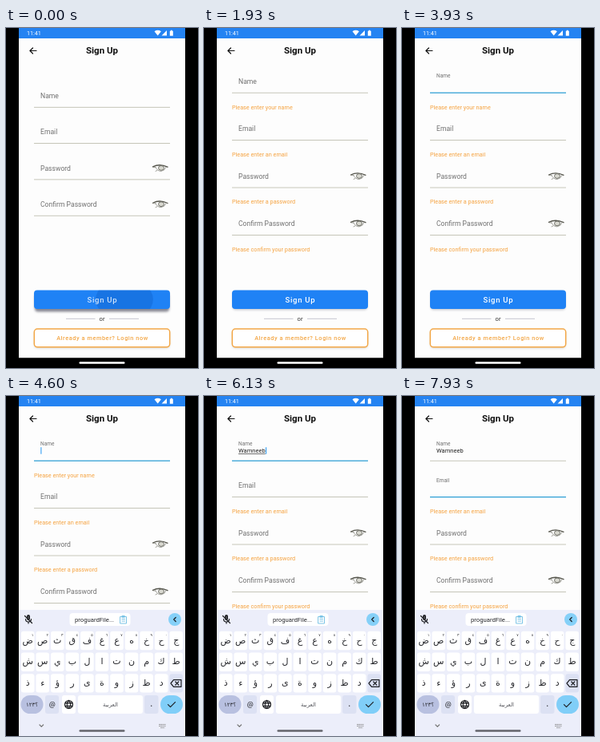
Recreate the animation shown at these times as an HTML page. Size 240 by 426 pixels, loop 8 s.

```html
<!DOCTYPE html>
<html lang="en">
<head>
<meta charset="utf-8">
<title>Sign Up form</title>
<style>
  html, body { margin: 0; width: 100%; height: 100%; overflow: hidden; background: #000; }
  svg { display: block; width: 100%; height: 100%; font-family: Roboto, sans-serif; }
  .icon { fill: none; stroke: #1b1c20; stroke-width: 1.2; stroke-linecap: round; stroke-linejoin: round; }
  .mid { text-anchor: middle; }
  .label { font-size: 8.6px; fill: #707070; }
  .error { font-size: 7.25px; fill: #f5a23f; }
  .key { font-family: "Noto Sans", "DejaVu Sans", sans-serif; font-size: 11px; fill: #25262b; text-anchor: middle; }
</style>
</head>
<body>
<svg id="stage" viewBox="0 0 240 426"></svg>
<script>
const LOOP = 8000;
const SUBMIT = 270, FOCUS_NAME = 3600, KEYBOARD = 3990, FOCUS_EMAIL = 7400;
const NAME = "Wamneeb";
const KEYSTROKES = [4730, 4930, 5130, 5270, 5470, 5670, 5870];
const FIELDS = [
  ["Name", "Please enter your name"],
  ["Email", "Please enter an email"],
  ["Password", "Please enter a password"],
  ["Confirm Password", "Please confirm your password"],
];

const clamp = x => Math.max(0, Math.min(1, x));
const ease = x => 1 - (1 - clamp(x)) ** 3;
const rect = (x, y, w, h, r, fill, extra = "") =>
  `<rect x="${x}" y="${y}" width="${w}" height="${h}" rx="${r}" fill="${fill}" ${extra}/>`;
const icon = (d, extra = "") => `<path class="icon" d="${d}" ${extra}/>`;

const eye = `<g transform="translate(193 -14.5)">
  ${icon("M-9.5-1.5Q-1-6 9-1.2", 'style="stroke:#55554c;stroke-width:1.3"')}
  ${icon("M-6-1Q-4 4 1 4Q6 3 7-1M-4 3L-6 4M-9-1L-6-.8", 'style="stroke:#8a8a80;stroke-width:.8"')}
  <ellipse cx="1" cy="0" rx="3.5" ry="2.9" fill="#d8d8d0" stroke="#66665e" stroke-width=".9"/>
</g>`;

const field = ([label, error], i) => `<g class="field">
  <text class="label" x="0" y="0">${label}</text>
  <rect class="line" x="35" width="170"/>
  <text class="error" x="35" y="20.4">${error}</text>
  ${i > 1 ? eye : ""}
</g>`;

function keyboard() {
  const rows = ["ضصثقفغعهخحج", "شسيبلاتنمكط", "ذءؤرىةوزظد"];
  const digits = "١٢٣٤٥٦٧٨٩٠";
  const keys = rows.map((row, r) => [...row].map((letter, c) => {
    const x = 27.2 + c * 18.55, y = 306.5 + r * 26.7;
    const digit = r === 0 && digits[c]
      ? `<text class="key" x="${x + 6}" y="${y - 6}" style="font-size:4.5px">${digits[c]}</text>` : "";
    return rect(x - 8.3, y - 11.7, 16.6, 23.4, 3, "#fff")
      + `<text class="key" x="${x}" y="${y + 3}">${letter}</text>` + digit;
  }).join("")).join("");

  return rect(16, 268, 208, 160, 0, "#eceefa") + keys
    // Suggestion strip
    + icon("M28 275.5v4M26.6 276v3a1.4 1.4 0 0 0 2.8 0v-3a1.4 1.4 0 0 0-2.8 0M24.5 279.5a3.5 3.5 0 0 0 7 0M28 283v2M23.5 275.5l9 9")
    + rect(79.5, 272, 76, 16, 4, "#fff")
    + `<text x="86" y="282.9" font-size="7.7" fill="#292a2f">proguardFile...</text>`
    + icon("M143 276.5h7.5v8.5h-7.5zM145.3 275.5h3v1.8h-3zM145 279.5h3.5M145 282h3.5", 'style="stroke:#7cc4e6;stroke-width:1"')
    + `<circle cx="211" cy="280" r="8" fill="#85d0f8"/>` + icon("M212.2 277.5l-2.5 2.5 2.5 2.5")
    // Backspace and bottom row
    + rect(204.4, 348.2, 16.6, 23.4, 3, "#dce1f3")
    + icon("M206 360l3.5-4.3h9.5v8.6h-9.5zM211.8 358l4 4M215.8 358l-4 4")
    + rect(18.5, 375, 28, 23, 11.5, "#b8c0e0")
    + `<text class="key" x="32.5" y="388.8" style="font-size:7px">؟١٢٣</text>`
    + rect(49, 375, 17, 23, 3, "#dce1f3")
    + `<text class="key" x="57.7" y="390" style="font-size:9px">@</text>`
    + rect(70, 375, 17, 23, 3, "#fff")
    + icon("M73.5 386.5a5 5 0 1 0 10 0a5 5 0 1 0-10 0M78.5 381.5q-4.5 5 0 10q4.5-5 0-10M74 384.8h9M74 388.3h9")
    + rect(90, 375, 81, 23, 3, "#fff")
    + `<text class="key" x="130.5" y="388.6" style="font-size:7px;fill:#55565c">العربية</text>`
    + rect(173, 375, 17.5, 23, 3, "#dce1f3")
    + `<text class="key" x="181.7" y="389">.</text>`
    + rect(193, 375, 28, 23, 11.5, "#80cef8") + icon("M202.5 386.7l3 3 6-6")
    // System row
    + icon("M42 412l2.3 2.3 2.3-2.3", 'style="stroke:#777"')
    + icon("M191.5 411.5h8.5M191.5 413.5h8.5M193.5 415.7h4.5", 'style="stroke:#888;stroke-width:.9;stroke-dasharray:1 1.2"')
    + rect(91.5, 418.3, 57, 2.4, 1.2, "#63646b");
}

const stage = document.getElementById("stage");
stage.innerHTML = `
  <defs>
    <clipPath id="screen">${rect(16, 0, 208, 426, 0, "#fff")}</clipPath>
    <clipPath id="buttonShape">${rect(35, 328.5, 170, 23.5, 4, "#fff")}</clipPath>
    <filter id="soft" x="-10%" y="-50%" width="120%" height="200%"><feGaussianBlur stdDeviation="1.5"/></filter>
  </defs>
  ${rect(0, 0, 240, 426, 0, "#000")}
  <g clip-path="url(#screen)">
    ${rect(16, 0, 208, 413.5, 0, "#fdfdfd")}
    ${rect(16, 0, 208, 13, 0, "#2483f2")}
    <text x="26" y="9" font-size="7.2" fill="#fff">11:41</text>
    <path d="M185.5 4.2q4.2-2.8 8.4 0l-4.2 5.3zM201 3v6.5h-6.5zM204.8 3.7h1v-.9h2v.9h1v6h-4z" fill="#fff"/>
    ${icon("M38 28.5h-8M33.5 25l-3.6 3.5 3.6 3.5", 'style="stroke:#111"')}
    <text class="mid" x="120" y="32.2" font-size="11.5" font-weight="700" fill="#111">Sign Up</text>

    ${FIELDS.map(field).join("")}
    <text id="typed" x="43" y="71.2" font-size="7.55" fill="#222"></text>
    <rect id="composing" x="43" y="72.3" height=".7" fill="#333"/>
    <rect id="cursor" width="1" height="8.5" fill="#2196f3"/>

    <rect id="shadow" x="36" y="331" width="168" height="23" rx="4" fill="#334" filter="url(#soft)"/>
    ${rect(35, 328.5, 170, 23.5, 4, "#1f82f5")}
    <ellipse id="ripple" cx="148" cy="340" ry="26" fill="#0a50b4" clip-path="url(#buttonShape)"/>
    <text id="buttonText" class="mid" x="120.4" y="343.6" font-size="9.5" font-weight="500" letter-spacing=".75" fill="#fff">Sign Up</text>
    <path d="M75 364.3h36.5M129 364.3h37" stroke="#b9b9c4" stroke-width=".8"/>
    <text class="mid" x="120" y="366.8" font-size="7.6" fill="#333">or</text>
    ${rect(35.5, 379, 169, 22.3, 4, "#665", 'opacity=".25" filter="url(#soft)"')}
    ${rect(35.3, 377, 169.4, 22.8, 4, "#fff", 'stroke="#f3a747" stroke-width="1.5"')}
    <text class="mid" x="120.5" y="391" font-size="7.4" font-weight="500" letter-spacing=".55" fill="#f3a747">Already a member? Login now</text>

    ${rect(16, 413.5, 208, 13, 0, "#000")}
    ${rect(91.5, 418.3, 57, 2.4, 1.2, "#fff")}
    <g id="keyboard">${keyboard()}</g>
  </g>`;

const $ = id => document.getElementById(id);
const set = (el, attrs) => { for (const k in attrs) el.setAttribute(k, attrs[k]); };
const fields = [...stage.querySelectorAll(".field")].map(group => ({
  group,
  label: group.querySelector(".label"),
  line: group.querySelector(".line"),
  error: group.querySelector(".error"),
}));

function drawFields(t, count) {
  const submitted = t >= SUBMIT;
  const focused = t >= FOCUS_EMAIL ? 1 : t >= FOCUS_NAME ? 0 : -1;
  const floating = [ease((t - FOCUS_NAME) / 200), ease((t - FOCUS_EMAIL) / 200), 0, 0];
  fields.forEach(({ group, label, line, error }, i) => {
    let y = submitted ? 81.2 + 59.4 * i : 99.3 + 45.3 * i;
    if (i && count) y -= 14;
    const lift = floating[i], active = i === focused;
    set(group, { transform: `translate(0 ${y})` });
    set(label, { transform: `translate(43 ${-11.3 - 7.5 * lift}) scale(${1 - 0.24 * lift})` });
    set(line, { y: active ? -0.6 : -0.4, height: active ? 1.2 : 0.8, fill: active ? "#259bd3" : "#b8b8a8" });
    set(error, { opacity: i === 0 && count ? 0 : clamp((t - SUBMIT) / 170) });
  });
}

function drawTyping(t, count) {
  const typed = $("typed");
  typed.textContent = NAME.slice(0, count);
  const width = count ? typed.getComputedTextLength() : 0;
  const onEmail = t >= FOCUS_EMAIL;
  set($("composing"), { width: onEmail ? 0 : width });

  const blinkStart = onEmail ? FOCUS_EMAIL : count ? KEYSTROKES[count - 1] : 3400;
  const visible = t >= FOCUS_NAME && Math.floor((t - blinkStart) / 500) % 2 === 0;
  set($("cursor"), { x: 43.4 + (onEmail ? 0 : width), y: onEmail ? 109.4 : 64.2, opacity: +visible });
}

function drawButton(t) {
  const press = 1 - clamp((t - 100) / 300);
  set($("shadow"), { opacity: 0.28 + 0.3 * press, y: 330.3 + 2.2 * press });
  set($("ripple"), { rx: 35 + 100 * ease(t / 350), opacity: 0.28 * press });
  set($("buttonText"), { opacity: 1 - 0.2 * press });
}

function draw() {
  const t = performance.now() % LOOP;
  const count = KEYSTROKES.filter(time => t >= time).length;
  drawFields(t, count);
  drawTyping(t, count);
  drawButton(t);
  set($("keyboard"), { transform: `translate(0 ${158 * (1 - ease((t - KEYBOARD) / 250))})` });
  requestAnimationFrame(draw);
}
draw();
</script>
</body>
</html>
```
